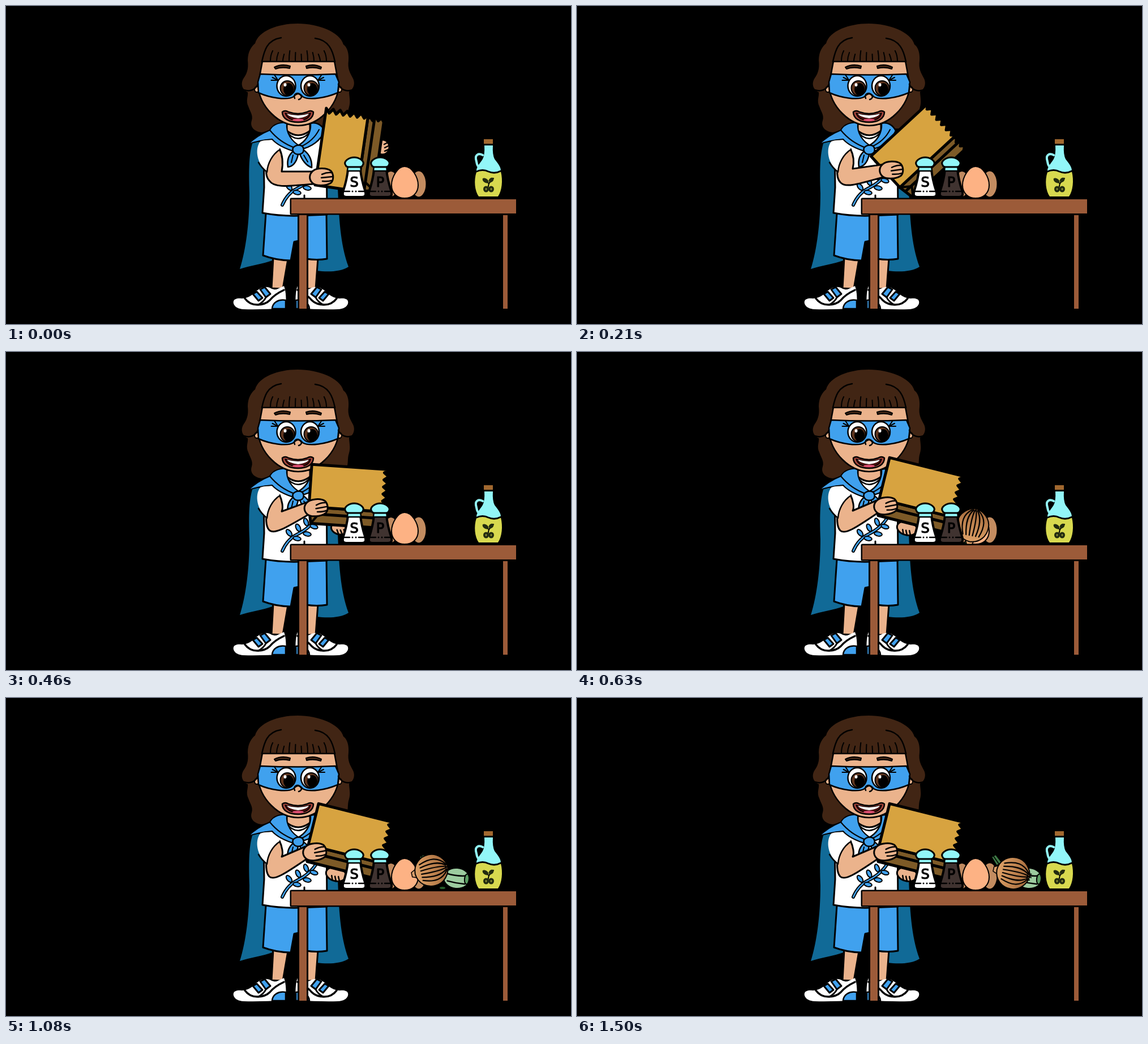
Write an HTML page with a canvas that moves like this. It is 998 px wide and 561 px high and loops after 1710 ms.

```html
<!DOCTYPE html>
<html lang="en">
<head>
<meta charset="utf-8">
<title>Groceries</title>
<style>
html, body { margin: 0; width: 100%; height: 100%; overflow: hidden; background: #000; }
canvas { display: block; width: 100%; height: 100%; }
</style>
</head>
<body>
<canvas id="stage" width="998" height="561"></canvas>
<script>
const ctx = document.getElementById('stage').getContext('2d');
const LOOP = 1710, STEP = 1000 / 24;
const SKIN = '#ebb38c', BLUE = '#40a1ee', TEAL = '#116a97', HAIR = '#412514',
      WOOD = '#9c5b39', TAN = '#d7a340', FOLD = '#7d5a27', CYAN = '#92f6f8', GREEN = '#9ccb9f';

function shape(d, fill, width = 3, stroke = '#000') {
  const path = new Path2D(d);
  if (fill) { ctx.fillStyle = fill; ctx.fill(path); }
  if (width) { ctx.lineWidth = width; ctx.strokeStyle = stroke; ctx.stroke(path); }
}

function line(d, width = 3, stroke = '#000') { shape(d, null, width, stroke); }

function oval(x, y, rx, ry, fill, width = 3, turn = 0) {
  ctx.beginPath();
  ctx.ellipse(x, y, rx, ry, turn, 0, Math.PI * 2);
  ctx.fillStyle = fill;
  ctx.fill();
  if (width) { ctx.lineWidth = width; ctx.strokeStyle = '#000'; ctx.stroke(); }
}

function placed(x, y, turn, draw) {
  ctx.save();
  ctx.translate(x, y);
  ctx.rotate(turn * Math.PI / 180);
  draw();
  ctx.restore();
}

const mix = (a, b, p) => a + (b - a) * p;

// Piecewise linear value through [time, value] pairs.
function track(n, keys) {
  if (n <= keys[0][0]) return keys[0][1];
  for (let i = 1; i < keys.length; i++) {
    const [t0, v0] = keys[i - 1], [t1, v1] = keys[i];
    if (n <= t1) return mix(v0, v1, (n - t0) / (t1 - t0));
  }
  return keys[keys.length - 1][1];
}

function shoe() {
  shape('M402 525C400 517 408 515 416 516C428 516 436 509 442 503C450 496 458 494 466 497Q474 503 482 498L491 494C495 504 495 520 494 533Q450 536 420 535Q405 534 402 525Z', '#fff', 0);
  shape('M470 534C471 523 481 517 494 519L494 534Z', BLUE, 2.5);
  line('M422 516Q430 527 444 527Q458 527 466 519Q474 509 491 501', 3.5);
  line('M446 527Q456 521 459 514', 3);
  shape('M436 508L443 504L453 515L446 520Z', BLUE, 3);
  shape('M449 500L457 496L467 508L459 514Z', BLUE, 3);
}

function lowerBody() {
  shape('M436 240C428 262 429 300 430 330C430 380 424 430 413 464C430 458 455 455 470 449L462 240Z', TEAL, 0);
  shape('M562 240L586 320C588 370 590 420 605 460C590 470 565 469 549 467L549 440Z', TEAL, 0);
  shape('M472 444L498 447L489 499L469 498Z', SKIN);
  shape('M530 445L551 445L547 499L530 499Z', SKIN);
  shoe();
  ctx.save();
  ctx.translate(1006, 0);
  ctx.scale(-1, 1);
  shoe();
  ctx.restore();
  shape('M459 366L454 440Q478 449 503 449L509 416L518 414L518 366Z', BLUE);
  shape('M530 366L530 446Q550 449 567 446L566 366Z', BLUE);
}

function torso() {
  shape('M455 236L456 320L453 365Q485 371 518 370L567 368L566 236L540 212L490 212Z', '#fff');
  line('M488 351C494 337 502 328 514 322C530 314 541 305 549 291', 6);
  line('M488 351C494 337 502 328 514 322C530 314 541 305 549 291', 2.5, BLUE);
  for (const [x, y, turn] of [[500, 319, 0.9], [516, 310, 1.1], [530, 300, 1.2], [514, 329, 0.2], [532, 321, 0.2], [544, 308, 0.3]])
    oval(x, y, 7, 3.7, BLUE, 2, turn);
  line('M527 334L527 339', 3);
  shape('M496 208L496 220Q516 236 537 220L537 208Z', SKIN);
  line('M493 219Q516 249 541 218', 2.5);
  shape('M427 244Q444 228 466 219C472 207 488 204 496 207C494 224 505 239 519 247L511 257C490 251 478 244 470 235Q446 237 427 244Z', BLUE, 2);
  shape('M538 207C548 204 558 210 563 220C556 237 540 249 520 253L514 247C529 240 539 225 538 207Z', BLUE, 2.5);
  line('M466 219Q484 241 510 250M553 218Q543 238 521 248', 2);
  shape('M509 255C499 262 496 272 498 284C507 283 513 276 516 262Z', BLUE, 2.5);
  shape('M518 258C522 272 531 282 540 285C541 270 534 258 522 252Z', BLUE, 2.5);
  line('M507 263L504 276M526 263L533 275', 2);
  shape('M507 250Q514 243 523 247Q528 252 524 259Q517 264 510 260Q505 256 507 250Z', BLUE, 2.5);
}

function eye(x, rx, side) {
  oval(x, 141, rx, 18, '#fff', 2.5);
  oval(x + 2, 145, 12.5, 13, '#60361f', 2);
  oval(x + 4, 147, 9, 11, '#000', 0);
  oval(x - 2, 139, 2.5, 3, '#fff', 0);
  const edge = x + side * rx;
  for (const [dx, dy] of [[4, -14], [8, -10], [10, -5]])
    line(`M${edge - side * 2} 131L${edge + side * dx} ${136 + dy}`, 2);
}

function head() {
  oval(443, 147, 4, 5, SKIN, 2);
  oval(589, 147, 4, 5, SKIN, 2);
  shape('M453 97L445 140C448 178 482 211 516 211C551 211 585 178 588 140L580 97Z', SKIN, 2.5);
  shape('M449 120Q516 123 582 120L588 134L586 153C565 162 536 167 524 160Q516 150 508 160C496 167 466 162 446 153L445 134Z', BLUE, 2.5);
  eye(495, 16.5, -1);
  eye(537, 16, 1);
  line('M510 163C506 155 517 151 520 157M520 157C524 160 521 164 517 165', 2.5);
  shape('M474 108Q487 101 502 106L501 110Q487 107 476 111Z', HAIR, 2);
  shape('M530 106Q544 101 557 108L556 111Q543 107 531 110Z', HAIR, 2);
  shape('M488 187Q493 183 499 187Q516 193 532 187Q538 183 543 187C543 199 531 205 516 205C500 205 488 199 488 187Z', '#a6463c', 2.5);
  shape('M493 189Q516 196 538 189C536 198 528 202 516 202C504 202 496 198 493 189Z', '#45100e', 1.5);
  shape('M496 190Q516 196 535 190Q532 196 516 198Q500 196 496 190Z', '#fff', 0);
  oval(516, 201, 10, 2, '#df4f74', 0);
  shape('M452 98C456 80 460 60 487 55L545 55C570 60 577 78 581 98Z', HAIR, 0);
  line('M452 98L581 98', 2.5);
  line('M452 98C456 80 460 60 486 56M581 98C577 78 570 60 546 57', 2.5);
  for (let i = 0; i < 10; i++) {
    const x = 467 + i * 11, lean = (516 - x) / 12, top = 79 + (i % 3) * 3;
    line(`M${x} 97Q${x} ${top + 8} ${x + lean} ${top}`, 2);
  }
  line('M420 148C432 152 441 147 445 138M612 148C600 152 591 147 587 138', 2.5);
}

function girl() {
  shape('M452 223C440 222 430 214 434 202C437 193 431 186 428 177C423 167 428 160 427 152C418 148 413 138 420 127C428 116 428 106 427 96C427 80 434 71 440 66C446 44 480 31 515 31C552 31 590 46 596 68C602 72 606 82 605 96C603 112 608 118 613 128C618 139 612 148 606 151C606 160 609 168 606 178C602 190 606 198 600 208L575 216L470 218Z', HAIR, 0);
  lowerBody();
  torso();
  head();
}

function farHand(p) {
  const q = 1 - p;
  const x = q * q * 665 + 2 * q * p * 625 + p * p * 583;
  const y = q * q * 249 + 2 * q * p * 310 + p * p * 311;
  placed(x, y, 104 * p, () => {
    oval(0, 0, 12, mix(13, 18, p), SKIN);
    line('M3 -5L11 -9M4 1L12 -3M4 7L11 4', 2.5);
  });
}

function bag(p) {
  const x = 593 - 10 * p + 23 * p * p, y = 257 - 22 * p + 4 * p * p;
  placed(x, y, mix(8.3, 104, p), () => {
    shape('M37 -64L41 -68L46 -62L51 -69L56 -63L61 -69L66 -62L66 60L37 65Z', FOLD, 5);
    line('M49 -64L49 60', 5);
    line('M37 65L50 48L66 60', 4);
    let top = '';
    for (let i = 0; i <= 12; i++) top += `L${-38 + i * 6.25} ${i % 2 ? -64 : -72}`;
    shape('M-38 65' + top + 'L37 65Z', TAN, 5);
  });
}

function nearArm(p) {
  const x = 557 - 12 * p * p, y = mix(301, 271, p), drop = 7 * p;
  shape(`M461 272C460 286 457 ${300 + drop} 465 ${308 + drop}C473 ${320 + drop / 3} 490 ${319 - drop} ${x - 14} ${y + 13}L${x - 16} ${y - 9}L487 ${292 - 12 * p}C490 275 488 262 483 252Z`, SKIN);
  shape('M449 239C439 253 443 277 461 293C462 278 470 262 484 253C478 240 466 233 449 239Z', '#fff', 0);
  line('M446 276Q452 286 461 293C462 278 470 262 484 253', 2.5);
  placed(x, y, -5 * p, () => {
    shape('M-15 -10C-8 -16 10 -16 17 -10C22 -4 22 6 17 11C8 17 -10 17 -16 11C-22 5 -22 -4 -15 -10Z', SKIN);
    line('M1 -4Q10 -8 18 -7M0 2L20 0M2 8Q12 9 18 7', 2.5);
  });
}

function squash(n) {
  if (n < 14) return;
  const end = track(n, [[15, 735], [21, 787], [26, 819], [27, 821]]);
  placed(end - 23, 318, 5, () => {
    oval(0, 0, 23, 18, GREEN, 2);
    line('M-18 -7Q0 -3 18 -6M-16 6Q0 9 15 9', 2.5);
    oval(18, 0, 4, 9, '#5b9d63', 2);
  });
  oval(end - 48, 335, 6, 3, '#245c2a', 2);
  if (n >= 23) placed(end - 81, 285, -28, () => {
    shape('M-5 -8L4 -8L7 10L-4 10Z', '#3e7a46', 2);
    line('M-1 -7L1 9', 1.5);
  });
}

function eggs() {
  oval(680, 314, 13, 23, '#c08a60', 2);
  oval(729, 314, 13.5, 23.5, '#c38c60', 2);
  shape('M704 283C717 283 728 302 728 316C728 331 717 339 704 339C692 339 681 331 681 316C681 302 692 283 704 283Z', '#fdb284', 2);
}

function onion(n) {
  if (n < 14) return;
  const x = track(n, [[14, 694], [15, 699], [21, 728], [26, 751], [30, 770]]);
  const y = track(n, [[15, 306], [21, 291], [26, 304], [30, 309]]);
  const turn = track(n, [[14, -85], [21, -43], [26, -13], [30, 12]]);
  placed(x, y, turn, () => {
    const skin = ctx.createLinearGradient(-28, 0, 30, 0);
    skin.addColorStop(0, '#dda066');
    skin.addColorStop(1, '#a2683a');
    shape('M-35 -4L-25 -9L-25 8L-35 4Z', '#d99d69', 1.5);
    shape('M-29 0C-28 -18 -14 -28 1 -28C18 -28 29 -13 30 0C29 13 18 28 1 28C-14 28 -28 18 -29 0Z', skin, 2);
    for (const k of [-0.75, -0.45, -0.15, 0.15, 0.45, 0.75])
      line(`M27 ${k * 8}C16 ${k * 27} 2 ${k * 29} -18 ${k * 19}`, 2.2);
    line('M26 -4L32 -5M26 0L33 1M26 4L31 6', 2);
  });
}

function table() {
  shape('M504 341L901 341L901 366L504 366Z', WOOD, 5);
  for (const [x, w] of [[518, 13], [878, 8]]) {
    shape(`M${x} 369h${w}v165h${-w}Z`, WOOD, 6);
    shape(`M${x} 369h${w}v165h${-w}Z`, WOOD, 0);
  }
  shape('M504 341L901 341L901 366L504 366Z', WOOD, 0);
}

function shaker(x, letter, body) {
  placed(x, 0, 0, () => {
    shape('M-11 289L11 289Q13 307 19 325Q23 337 14 337L-14 337Q-23 337 -19 325Q-13 307 -11 289Z', body, 4);
    shape('M-11 280L11 280L12 291L-12 291Z', CYAN, 2.5);
    shape('M-15 281C-20 274 -9 267 0 267C9 267 20 274 15 281Q14 284 10 284L-10 284Q-14 284 -15 281Z', CYAN, 3);
    line('M-18 327H-8M8 327H18', 2.5);
    oval(-3, 327, 1.5, 1.5, '#000', 0);
    oval(3, 327, 1.5, 1.5, '#000', 0);
    ctx.fillStyle = ctx.strokeStyle = '#000';
    ctx.lineWidth = 1.2;
    ctx.font = '24px "DejaVu Sans", sans-serif';
    ctx.textAlign = 'center';
    ctx.fillText(letter, 0, 319);
    ctx.strokeText(letter, 0, 319);
  });
}

function bottle() {
  line('M842 263C834 259 829 263 830 270L832 279Q834 286 840 284', 4, CYAN);
  shape('M845 246H860Q859 262 863 270C869 278 875 284 874 293L874 300L831 300L831 293C830 284 837 278 842 270Q846 262 845 246Z', CYAN, 0);
  shape('M831 293Q842 288 852 293Q863 298 874 292C878 308 876 326 869 336L835 336C828 326 826 308 831 293Z', '#d8d94f', 0);
  line('M831 292Q842 287 852 292Q863 297 874 291', 3);
  shape('M844 235H860V243H844Z', '#a1682f', 0);
  line('M851 322L853 313L861 304M853 313L846 308', 2);
  oval(847, 308, 6, 3.5, '#222b10', 0, 0.6);
  oval(857, 307, 5, 3.5, '#222b10', 0, -0.7);
  oval(848, 323, 5, 5.5, '#222b10', 0);
  oval(857, 323, 5, 5.5, '#222b10', 0);
  oval(848, 323, 1.5, 2, '#858a35', 0);
  oval(857, 323, 1.5, 2, '#858a35', 0);
}

function render(time) {
  const n = Math.floor((time % LOOP + 5) / STEP);
  const tilt = Math.min(1, n / 12.3);
  ctx.fillStyle = '#000';
  ctx.fillRect(0, 0, 998, 561);
  ctx.lineCap = ctx.lineJoin = 'round';
  girl();
  farHand(tilt);
  bag(tilt);
  nearArm(tilt);
  squash(n);
  eggs();
  onion(n);
  table();
  shaker(615, 'S', '#fff');
  shaker(661, 'P', '#403330');
  bottle();
}

const start = performance.now();
function tick() {
  render(performance.now() - start);
  requestAnimationFrame(tick);
}
tick();
</script>
</body>
</html>
```
